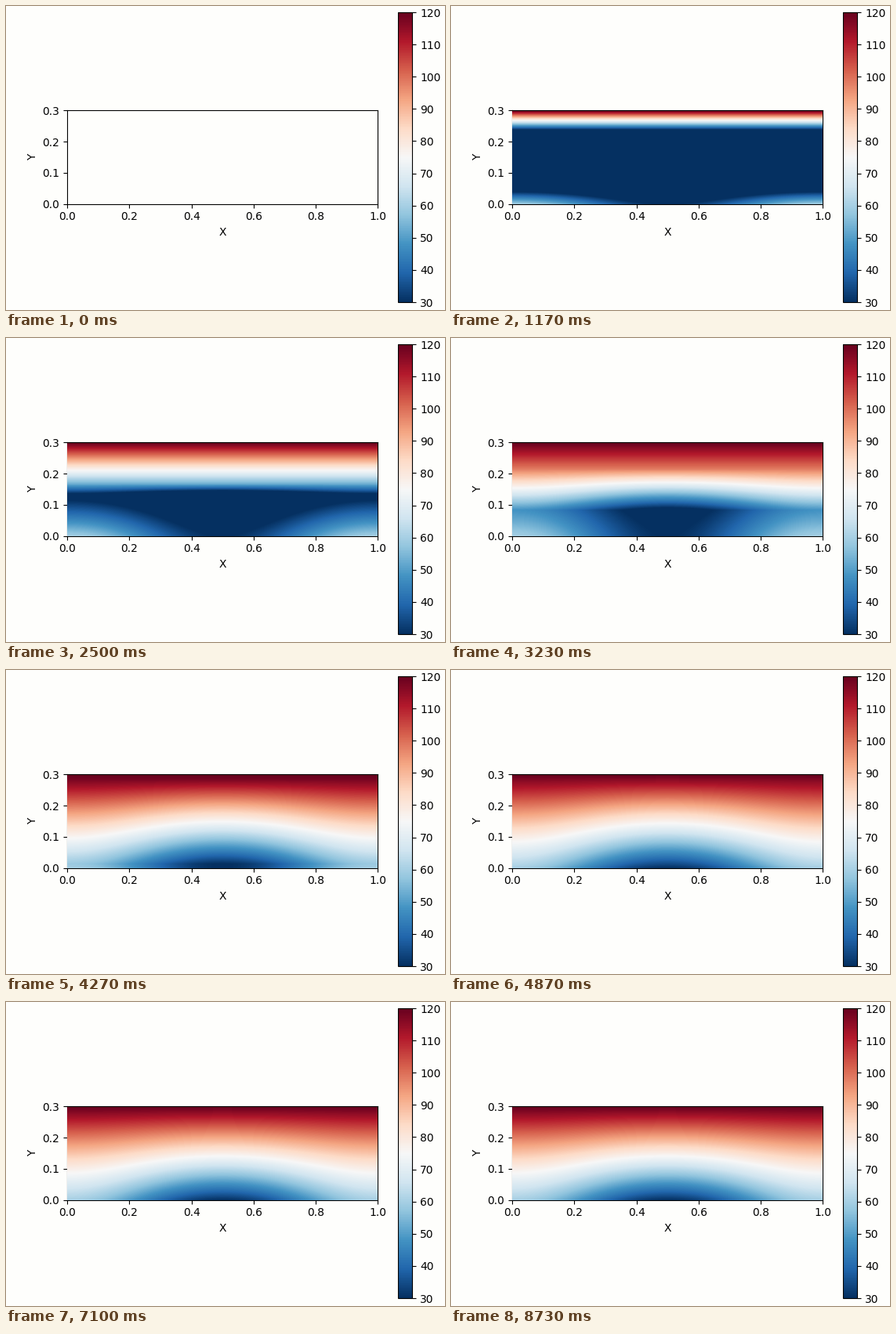
A matplotlib script that plays this animation: 560 px wide and 388 px high, repeating every 8.76 s.

```python
import numpy as np
import matplotlib as mpl
import matplotlib.pyplot as plt
from matplotlib.animation import FuncAnimation
from matplotlib.colors import Normalize

W, H, DPI = 560, 388, 100
FRAMES, INTERVAL = 292, 30
PAPER = "#fefefc"

plt.rcParams.update({"font.family": "DejaVu Sans", "font.size": 10})

# Plate: hot top edge, cosine profile on the bottom edge, insulated sides
DEPTH, ROWS = 0.3, 150
T_TOP, BASE, SWING = 120, 45, 15
NX, NY = 396, 119

STEP = DEPTH / ROWS
STIFFNESS = np.array([2, 2 + (2 * np.pi * STEP) ** 2])
WEIGHT = np.array([1, 0.5])


def laplace(u):
    out = STIFFNESS * u
    out[1:] -= u[:-1]
    out[:-1] -= u[1:]
    return out


def dot(a, b):
    return np.sum(WEIGHT * a * b)


def solve(count):
    """Conjugate gradient iterates; columns hold the mean and cosine parts."""
    u = np.zeros((ROWS - 1, 2))
    r = np.zeros_like(u)
    r[0] = BASE, SWING
    r[-1, 0] = T_TOP
    p, rr = r.copy(), dot(r, r)
    states = [u]
    for _ in range(count - 1):
        if rr > 1e-12:
            ap = laplace(p)
            a = rr / dot(p, ap)
            u = u + a * p
            r = r - a * ap
            rr, last = dot(r, r), rr
            p = r + rr / last * p
        states.append(u)
    return states


states = solve(FRAMES)
nodes = np.linspace(0, DEPTH, ROWS + 1)
y = (np.arange(NY) + 0.5) / NY * DEPTH
wave = np.cos(2 * np.pi * (np.arange(NX) + 0.5) / NX)


def temperature(frame):
    u = np.vstack([(BASE, SWING), states[frame], (T_TOP, 0)])
    mean, side = (np.interp(y, nodes, part) for part in u.T)
    return mean[:, None] + side[:, None] * wave


def pixel_axes(left, top, right, bottom):
    return fig.add_axes([left / W, 1 - bottom / H, (right - left) / W, (bottom - top) / H],
                        facecolor=PAPER)


fig = plt.figure(figsize=(W / DPI, H / DPI), dpi=DPI, facecolor=PAPER)
cmap, norm = mpl.colormaps["RdBu_r"], Normalize(30, 120)

ax = pixel_axes(78, 133.46, 474.45, 252.54)
ax.set(xlim=(0, 1), ylim=(0, DEPTH), xlabel="X", ylabel="Y",
       xticks=np.arange(6) / 5, yticks=np.arange(4) / 10)

cax = pixel_axes(499.9, 8, 518.4, 378)
fig.colorbar(mpl.cm.ScalarMappable(norm, cmap), cax=cax, ticks=range(30, 121, 10))

plate = fig.figimage(temperature(1), xo=78, yo=H - 253, cmap=cmap, norm=norm,
                     origin="lower", zorder=3)


def draw(frame):
    plate.set_visible(frame > 0)
    if frame:
        plate.set_array(temperature(frame))
    return [plate]


anim = FuncAnimation(fig, draw, frames=FRAMES, interval=INTERVAL,
                     repeat=True, repeat_delay=0, blit=False)
plt.show()
```
